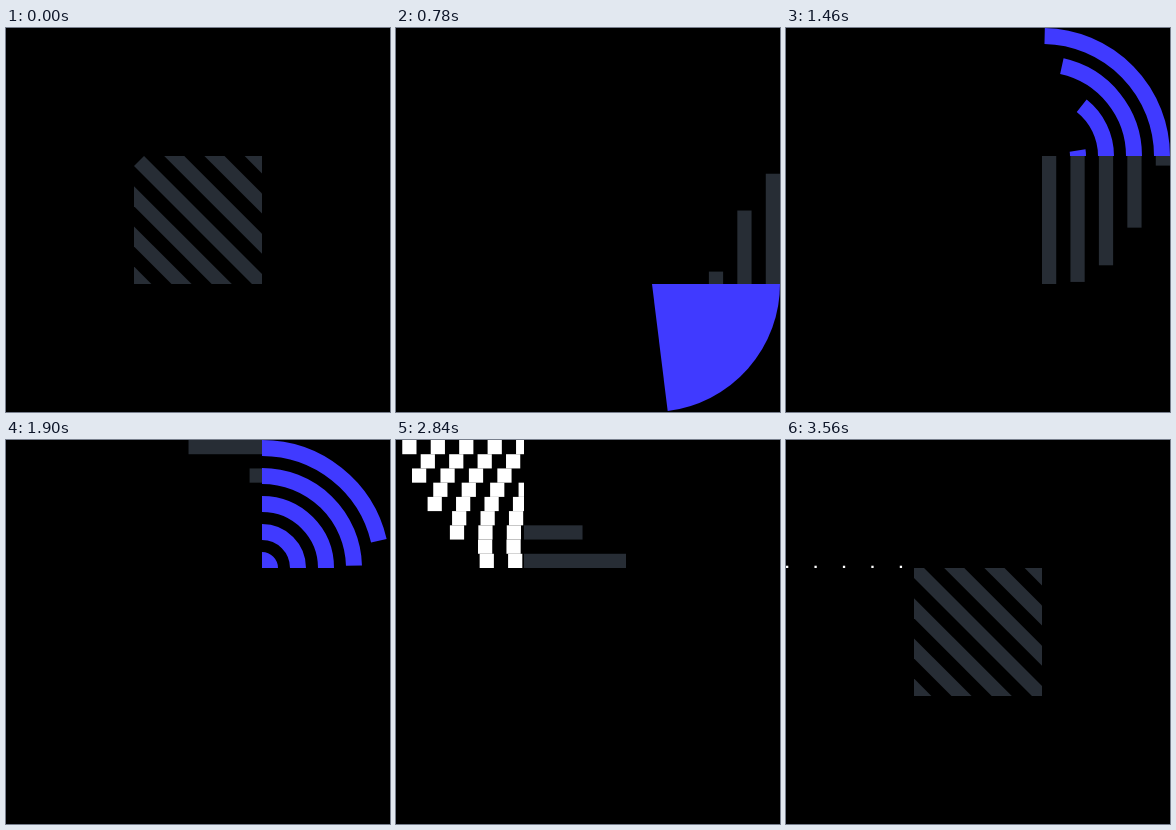
Animation, 384 px wide and 384 px high, one loop 3580 ms. Source, as an HTML page with a canvas:

```html
<!DOCTYPE html>
<html lang="en">
<head>
<meta charset="utf-8">
<title>Shape relay</title>
<style>
  html, body { margin: 0; height: 100%; overflow: hidden; background: #000; }
  canvas { display: block; }
</style>
</head>
<body>
<canvas id="stage" width="384" height="384"></canvas>
<script>
const ctx = document.getElementById('stage').getContext('2d');
const LOOP = 3580, TILE = 128, CELL = TILE / 9;
const SLATE = '#272d35', BLUE = '#403aff', WHITE = '#fff';

const progress = (t, start, length) => Math.min(1, Math.max(0, (t - start) / length));
const easeOut = (t, start, length, power = 2.3) => 1 - (1 - progress(t, start, length)) ** power;
const easeIn = (t, start, length, power = 2.3) => progress(t, start, length) ** power;

// Leading and trailing edge (0..1) of the i-th staggered part in a stage
const edges = (t, stage, i) => [
  easeOut(t, stage + 8 + i * 80, 300),
  easeIn(t, stage + 571 + i * 80, 300)
];

function inTile(column, row, draw) {
  ctx.save();
  ctx.translate(column * TILE, row * TILE);
  ctx.beginPath();
  ctx.rect(0, 0, TILE, TILE);
  ctx.clip();
  draw();
  ctx.restore();
}

// Ring sector; angles in quarter turns
function sector(x, y, radius, width, from, to) {
  if (radius <= 0 || to <= from) return;
  ctx.strokeStyle = BLUE;
  ctx.lineWidth = width;
  ctx.beginPath();
  ctx.arc(x, y, radius - width / 2, from * Math.PI / 2, to * Math.PI / 2);
  ctx.stroke();
}

function diagonals(t) {
  const leaveTime = t > LOOP / 2 ? t - 3600 : t;
  const length = TILE * Math.SQRT2 + CELL;
  ctx.fillStyle = SLATE;
  ctx.rotate(Math.PI / 4);
  for (let k = -3; k <= 3; k++) {
    const order = Math.abs(k);
    const head = t > LOOP / 2 ? easeOut(t, 3008 + order * 80, 540) : 1;
    const tail = easeIn(leaveTime, -143 + order * 134, 450);
    if (head > tail) {
      ctx.fillRect(tail * length - CELL / 2, (2 * k - 0.5) * CELL, (head - tail) * length, CELL);
    }
  }
}

function quarterDisc(t) {
  const radius = TILE * easeOut(t, 8, 503);
  sector(256, 256, radius, radius, 0, 1 - easeIn(t, 571, 636));
}

function columns(t) {
  ctx.fillStyle = SLATE;
  for (let i = 0; i < 5; i++) {
    const [head, tail] = edges(t, 600, i);
    ctx.fillRect((8 - 2 * i) * CELL, TILE * (1 - head), CELL, TILE * (head - tail));
  }
}

function arcs(t) {
  for (let i = 0; i < 5; i++) {
    const [head, tail] = edges(t, 1200, i);
    sector(256, 128, TILE - 28 * i, 16, -head, -tail);
  }
}

function rows(t) {
  ctx.fillStyle = SLATE;
  for (let i = 0; i < 5; i++) {
    const [head, tail] = edges(t, 1800, i);
    ctx.fillRect(TILE * (1 - head), 2 * i * CELL, TILE * (head - tail), CELL);
  }
}

function checks(t) {
  ctx.fillStyle = WHITE;
  for (let row = 0; row < 9; row++) {
    const shift = TILE * (1 - easeOut(t, 2429 + row * 40, 588, 2.5));
    const size = CELL * (1 - easeIn(t, 2963 + row * 40, 300));
    for (let col = row % 2; col < 9; col += 2) {
      ctx.fillRect(col * CELL + shift, (row + 1) * CELL - size, size, size);
    }
  }
}

function frame(now) {
  const t = now % LOOP;
  ctx.fillStyle = '#000';
  ctx.fillRect(0, 0, 384, 384);
  inTile(1, 1, () => diagonals(t));
  quarterDisc(t);
  inTile(2, 1, () => columns(t));
  arcs(t);
  inTile(1, 0, () => rows(t));
  inTile(0, 0, () => checks(t));
}

const begin = performance.now();
function tick() {
  frame(performance.now() - begin);
  requestAnimationFrame(tick);
}
tick();
</script>
</body>
</html>
```
